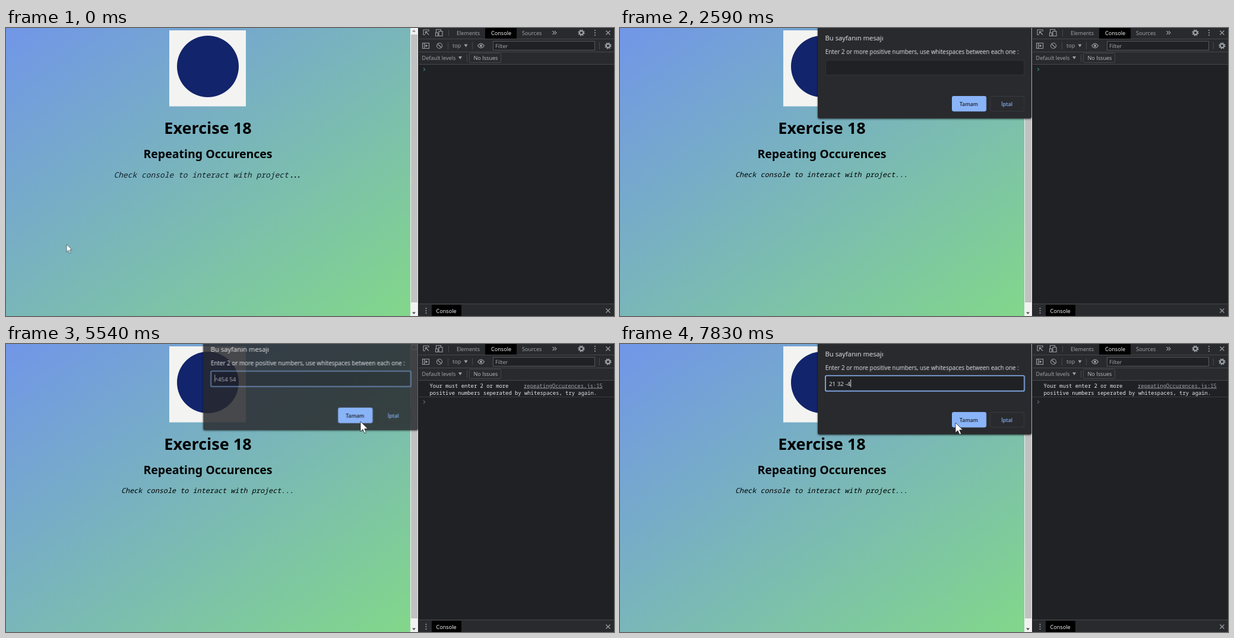
Animation of 1024 by 487 pixels, one loop 7990 ms. Source, as an HTML page:

```html
<!DOCTYPE html>
<html lang="en">
<head>
<meta charset="utf-8">
<title>Repeating Occurences</title>
<style>
  html, body { margin: 0; width: 100%; height: 100%; overflow: hidden; background: #202124; }
  .page { position: absolute; left: 0; top: 0; width: 681px; height: 487px;
    background: linear-gradient(to bottom right, #7196e8, #82d78a); }
  svg { position: absolute; left: 0; top: 0; width: 1024px; height: 487px; display: block; }
  text { font: 9.1px "Open Sans", "Noto Sans", sans-serif; white-space: pre; }
  .mid { text-anchor: middle; }
  .head { font: bold 27px "Noto Sans", "Open Sans", sans-serif; }
  .sub { font: bold 19.5px "Noto Sans", "Open Sans", sans-serif; }
  .note { font: italic 11.82px "Noto Sans Mono", "DejaVu Sans Mono", monospace; }
  .note.wide { font-size: 12.92px; fill: #14202a; }
  .note.tight { letter-spacing: -1.8px; font-weight: bold; }
  .code { font: 8.87px "Noto Sans Mono", "DejaVu Sans Mono", monospace; fill: #e8eaed; }
  .link { fill: #9aa0a6; text-decoration: underline; }
  .title { font-size: 11.24px; fill: #e8eaed; }
  .ask { font-size: 9.83px; fill: #e8eaed; }
  .value { font-size: 9.7px; fill: #e8eaed; }
  .button { font-size: 8.7px; font-weight: 600; }
  .ui { fill: #a4a9ae; }
  .icon { fill: none; stroke: #9aa0a6; stroke-width: 1.1; }
  .rule { fill: none; stroke: #46484b; }

  /* every part jumps from pose to pose on one shared loop */
  .play { animation: 7990ms step-end infinite; }
  #noteWide { animation-name: before; }
  #note { animation-name: after; }
  #dialog { animation-name: dialog; transform-origin: 513px 0; }
  #panel { animation-name: panel; }
  #ring { animation-name: ring; }
  #caret { animation-name: caret; }
  #first { animation-name: first; }
  #second { animation-name: second; }
  #log { animation-name: log; }
  #prompt { animation-name: prompt; }
  #cursor { animation-name: cursor; transform-origin: 0 0; }

  @keyframes before { 0% { opacity: 1; } 12.14% { opacity: 0; } }
  @keyframes after { 0% { opacity: 0; } 12.14% { opacity: 1; } }
  @keyframes dialog {
    0% { opacity: 0; transform: none; }
    12.14% { opacity: 1; transform: translateY(-1.2px) scale(1.003); }
    14.14% { opacity: 1; transform: none; }
    69.33% { opacity: 1; transform: translateY(-8px) scale(1.005); }
    71.33% { opacity: 1; transform: none; }
  }
  @keyframes panel {
    0% { opacity: .93; } 14.14% { opacity: 1; }
    69.33% { opacity: .85; } 71.33% { opacity: 1; }
  }
  @keyframes ring {
    0% { opacity: 1; } 30.41% { opacity: .5; } 32.41% { opacity: 0; }
    61.32% { opacity: 1; } 69.33% { opacity: .6; } 71.33% { opacity: 1; }
    81.6% { opacity: 0; } 95.99% { opacity: 1; }
  }
  @keyframes caret {
    0% { opacity: 1; } 30.41% { opacity: 0; } 69.33% { opacity: 1; }
    73.34% { opacity: 0; } 75.34% { opacity: 1; } 81.6% { opacity: 0; }
  }
  @keyframes first { 0% { opacity: 0; } 61.32% { opacity: 1; } 69.33% { opacity: .75; } 71.33% { opacity: 0; } }
  @keyframes second { 0% { opacity: 0; } 95.99% { opacity: 1; } }
  @keyframes log { 0% { opacity: 0; } 69.33% { opacity: 1; } }
  @keyframes prompt {
    0% { transform: none; stroke: #35807a; }
    69.33% { transform: translateY(28px); stroke: #56697a; }
  }
  @keyframes cursor {
    0% { transform: translate(102px, 366px) scale(.74); }
    2% { transform: translate(101px, 310px) scale(.74); }
    4% { transform: translate(92px, 190px) scale(.74); }
    6% { transform: translate(80px, 60px) scale(.74); }
    8.01% { transform: translate(71px, -11px); }
    14.14% { transform: translate(52px, 8px); }
    16.14% { transform: translate(34px, 40px); }
    18.14% { transform: translate(17px, 85px); }
    20.15% { transform: translate(4px, 125px); }
    22.15% { transform: translate(-6px, 150px); }
    24.15% { transform: translate(-50px, 155px); }
    59.32% { transform: translate(581px, 83px); }
    61.32% { transform: translate(588px, 105px); }
    63.32% { transform: translate(595px, 126px); }
    65.33% { transform: translate(597px, 131px); }
    71.33% { transform: translate(605px, 133px); }
    73.34% { transform: translate(122px, 176px); }
    75.34% { transform: translate(-50px, 155px); }
    89.86% { transform: translate(80px, 131px) scale(.74); }
    91.86% { transform: translate(-50px, 155px); }
    95.99% { transform: translate(556px, 142px); }
    97.99% { transform: translate(565px, 133px); }
  }
</style>
</head>
<body>
<div class="page"></div>
<svg viewBox="0 0 1024 487">
  <defs>
    <filter id="shade" x="-10%" y="-10%" width="120%" height="130%" color-interpolation-filters="sRGB">
      <feDropShadow dx="0" dy="1" stdDeviation="1.6" flood-color="#000" flood-opacity=".6"/>
    </filter>
    <g id="gear" class="icon">
      <circle r="3.2" stroke-width="2.2"/>
      <circle r="4.9" stroke-width="1.5" stroke-dasharray="2 1.85"/>
    </g>
    <path id="close" class="icon" d="M-3.5-3.5l7 7m0-7l-7 7" style="stroke-width:1.3"/>
    <g id="dots" fill="#9aa0a6"><circle cy="-4" r="1.1"/><circle r="1.1"/><circle cy="4" r="1.1"/></g>
    <path id="down" d="M-3-2.5h6l-3 5z" fill="#9aa0a6"/>
  </defs>

  <!-- page -->
  <rect x="275" y="4" width="129" height="128.5" fill="#f3f3f2"/>
  <circle cx="340" cy="65" r="52" fill="#12246b"/>
  <text class="head mid" x="340" y="178.5">Exercise 18</text>
  <text class="sub mid" x="340" y="220">Repeating Occurences</text>
  <g id="noteWide" class="play">
    <text class="note wide" x="181.5" y="252.5">Check console to interact with project</text>
    <text class="note wide tight" x="477" y="252.5">...</text>
  </g>
  <text id="note" class="note play" x="194" y="251.5">Check console to interact with project...</text>

  <!-- scrollbar -->
  <rect x="681" width="13" height="487" fill="#f1f1f1"/>
  <rect x="682" y="11" width="11" height="453" fill="#c1c1c1"/>
  <path d="M684 6.5h6l-3-3.5z" fill="#8a8a8a"/>
  <path d="M684 480.5h6l-3 3.5z" fill="#505050"/>

  <!-- developer tools -->
  <rect x="694" width="330" height="487" fill="#202124"/>
  <rect x="695" width="329" height="61" fill="#292a2d"/>
  <rect x="695" y="467" width="329" height="20" fill="#292a2d"/>
  <rect x="807" width="53" height="18" fill="#000"/>
  <rect x="717" y="468" width="50" height="19" fill="#000"/>
  <path class="rule" d="M695 18.5h329M695 40.5h329M695 61.5h329M695 466.5h329"/>
  <path class="rule" d="M745.5 3v11M744.5 24v12M785.5 24v12M999.5 24v12M776.5 45v12"/>

  <path class="icon" d="M706 11.5h-3v-8.5h9v3M706.5 6l5.5 5.5m-5.5-1.5v-4h4"/>
  <path class="icon" d="M724.5 8v-5.5h8v3M723.5 13.5h4v-5.5h-4zM729 13.5h6v-8h-6z"/>
  <text class="ui" x="759" y="12">Elements</text>
  <text x="817" y="12" fill="#fff">Console</text>
  <text class="ui" x="869" y="12">Sources</text>
  <path class="icon" d="M920.5 5l3 3-3 3m3.5-6l3 3-3 3"/>
  <use href="#gear" x="969" y="8"/>
  <use href="#dots" x="992" y="8"/>
  <use href="#close" x="1014" y="8"/>

  <path class="icon" d="M701.5 25.5h11v9h-11zM704.5 25.5v9"/>
  <path d="M706.5 27.5v5l4-2.5z" fill="#9aa0a6"/>
  <g class="icon"><circle cx="730" cy="30" r="4.5"/><path d="M727 27l6 6"/></g>
  <text class="ui" x="752" y="33">top</text>
  <use href="#down" x="774.5" y="30"/>
  <path class="icon" d="M794.5 30q5.5-7.5 11 0q-5.5 7.5-11 0z"/>
  <circle cx="800" cy="30" r="2" fill="#9aa0a6"/>
  <rect x="820.5" y="22.5" width="171" height="15" fill="#202124" stroke="#55585b"/>
  <text class="ui" x="824" y="33.5">Filter</text>
  <use href="#gear" x="1014" y="30"/>

  <text class="ui" x="700.5" y="54">Default levels</text>
  <use href="#down" x="765" y="50.5"/>
  <rect class="rule" x="780.5" y="42.5" width="53" height="16" rx="1"/>
  <text x="787.5" y="54" fill="#bdc1c6">No Issues</text>

  <g id="log" class="play">
    <text class="code" x="713.5" y="73.5">Your must enter 2 or more</text>
    <text class="code link" x="872" y="73.5">repeatingOccurences.js:15</text>
    <text class="code" x="713.5" y="85.5">positive numbers seperated by whitespaces, try again.</text>
    <path class="rule" d="M695 89.5h329" style="stroke:#3a3c3f"/>
  </g>
  <path id="prompt" class="play" d="M703 67.5l2.8 2.5-2.8 2.5" fill="none" stroke-width="1.1"/>

  <use href="#dots" x="707.5" y="478"/>
  <text x="724.5" y="482" fill="#fff">Console</text>
  <use href="#close" x="1014" y="478"/>

  <!-- prompt window -->
  <g id="dialog" class="play">
    <g id="panel" class="play">
      <rect x="333" y="-12" width="360" height="165" rx="3" fill="#292a2d" filter="url(#shade)"/>
      <rect x="346.5" y="54.5" width="334" height="25" fill="#202124" stroke="#35363a"/>
    </g>
    <text class="title" x="345.5" y="21">Bu sayfanın mesajı</text>
    <text class="ask" x="345.8" y="43.5">Enter 2 or more positive numbers, use whitespaces between each one :</text>
    <rect id="ring" class="play" x="346" y="53.5" width="335" height="26" rx="2" fill="none" stroke="#8ab4f8" stroke-width="1.7"/>
    <path id="caret" class="play" d="M352.5 59.5v12.5" stroke="#9aa0a6"/>
    <text id="first" class="value play" x="352.5" y="70.5">^454 54</text>
    <g id="second" class="play">
      <text class="value" x="352" y="70.5">21 32 -4</text>
      <path d="M388.5 60v13" stroke="#e8eaed"/>
    </g>
    <rect x="559" y="115" width="58" height="26" rx="3" fill="#8ab4f8"/>
    <text class="button mid" x="587.5" y="131.5" fill="#202124">Tamam</text>
    <rect x="623.5" y="115.5" width="57" height="25" rx="3" fill="none" stroke="#3a3c40"/>
    <text class="button mid" x="651.5" y="131.5" fill="#8ab4f8">İptal</text>
  </g>

  <path id="cursor" class="play" d="M0 0V17L4 13.4L6.8 20L9.6 18.8L6.8 12.3H12.3Z"
    fill="#fff" stroke="#222" stroke-width=".8"/>
</svg>
</body>
</html>
```
